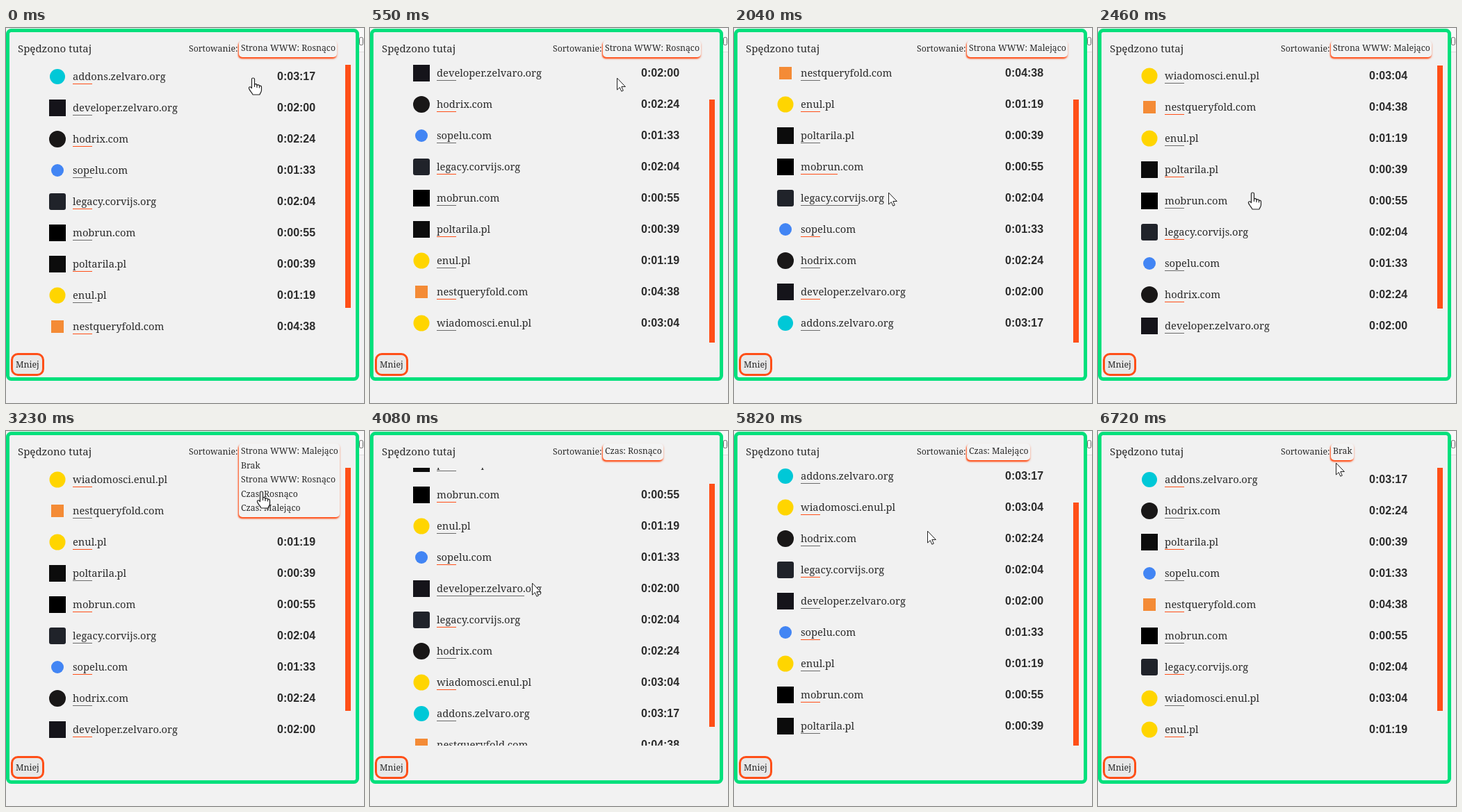
Animation, 515 px wide and 540 px high, one loop 6770 ms. Source, as an HTML page:

```html
<!DOCTYPE html>
<html lang="pl">
<head>
<meta charset="utf-8">
<style>
  html, body { margin: 0; width: 100%; height: 100%; overflow: hidden; background: #f2f2f2; }
  #stage { position: relative; width: 515px; height: 540px; overflow: hidden; cursor: default; }
  svg { position: absolute; left: 0; top: 0; display: block; }
  text, #menu { font-family: "Noto Serif", serif; fill: #2b2b2b; color: #2b2b2b; }
  .small, #menu { font-size: 12.3px; }
  .label { font-size: 14.7px; }
  .time { font: bold 16px "Liberation Sans", Arial, sans-serif; }
  #menu {
    position: absolute; left: 335px; top: 18px; padding: 1px 2px 2px 3px;
    line-height: 20.5px; white-space: nowrap; border-radius: 5px; background: #f3f3f3;
    box-shadow: -1px 2px 2px #ff4f18, 0 2px 3px rgba(255, 79, 24, .5);
  }
</style>
</head>
<body>
<div id="stage">
  <svg width="515" height="540" viewBox="0 0 515 540">
    <defs><clipPath id="view"><rect x="5" y="53" width="480" height="400"/></clipPath></defs>
    <rect width="515" height="540" fill="#f2f2f2"/>
    <rect x="505" width="10" height="34" fill="#f8f8f8"/>
    <path d="M505 34.5H515" stroke="#dedede"/>
    <rect x="508.5" y="13.5" width="5" height="11" rx="2" fill="none" stroke="#666"/>
    <rect x="2.5" y="3.5" width="503" height="502" rx="5" fill="#f1f1f1" stroke="#00e07c" stroke-width="5"/>
    <text x="17" y="35" font-size="15">Spędzono tutaj</text>
    <text x="263" y="34" class="small">Sortowanie:</text>
    <g id="list" clip-path="url(#view)"></g>
    <rect id="thumb" x="488" y="53" width="8" height="350" fill="#ff4f18"/>
    <rect x="8.5" y="469.5" width="45" height="30" rx="8.5" fill="#e8e8e8" stroke="#ff4f18" stroke-width="3"/>
    <text x="14" y="489" class="small">Mniej</text>
  </svg>
  <div id="menu"></div>
  <svg width="515" height="540" viewBox="0 0 515 540">
    <g id="cursor" fill="#fff" stroke="#222" stroke-linejoin="round" stroke-linecap="round">
      <g id="hand" stroke-width="1.2">
        <path d="M-2 1C-2-1 2-1 2 1V9C3 7.5 5.5 8 5.5 10C6.5 8.8 9 9.3 9 11C10 10.3 12 10.8 12 12.5V17C12 20 10 21 9.5 23.5H-.5C-1 21-5 18-6 14.5C-6.5 12.5-4.5 11.5-3 13L-2 14Z"/>
        <path d="M2 9V12M5.5 10V13M9 11V13.5" fill="none"/>
      </g>
      <path id="arrow" d="M0 0V16.5L3.8 13L6.3 18.7L8.8 17.6L6.3 12H11.5Z"/>
    </g>
  </svg>
</div>
<script>
const LOOP = 6770, STEP = 50, ROW = 45, LINE = 20.5, MAX_SCROLL = 50, SHORT = 28;
const $ = id => document.getElementById(id);

const circle = (color, size = 24) => ({ color, size, rx: size / 2 });
const square = (color, size = 24, rx = 0) => ({ color, size, rx });

const items = [
  ["addons.zelvaro.org", "0:03:17", circle("#00c8d7", 22)],
  ["developer.zelvaro.org", "0:02:00", square("#15141a")],
  ["hodrix.com", "0:02:24", circle("#191717")],
  ["sopelu.com", "0:01:33", circle("#4285f4", 18)],
  ["legacy.corvijs.org", "0:02:04", square("#20232a", 24, 3)],
  ["mobrun.com", "0:00:55", square("#000")],
  ["poltarila.pl", "0:00:39", square("#0c0c0c")],
  ["enul.pl", "0:01:19", circle("#ffd500", 23)],
  ["nestqueryfold.com", "0:04:38", square("#f48b36", 18)],
  ["wiadomosci.enul.pl", "0:03:04", circle("#ffd500", 23)]
];

const byName = items.map((_, i) => i);
const byTime = [...byName].sort((a, b) => items[a][1] < items[b][1] ? -1 : 1);
const sorts = [
  ["Brak", [0, 2, 6, 3, 8, 5, 4, 9, 7, 1]],
  ["Strona WWW: Rosnąco", byName],
  ["Strona WWW: Malejąco", [...byName].reverse()],
  ["Czas: Rosnąco", byTime],
  ["Czas: Malejąco", [...byTime].reverse()]
];

// Each round: rest at a spot, open the menu, pick the option on a given line
const rounds = [
  { rest: [355, 72], open: 1130, pick: 1480, from: 1, to: 2, x: 374, line: 2 },
  { rest: [222, 237], open: 2930, pick: 3480, from: 2, to: 3, x: 367, line: 3 },
  { rest: [233, 219], open: 4580, pick: 4880, from: 3, to: 4, x: 375, line: 4 },
  { rest: [278, 144], open: 6280, pick: 6680, from: 4, to: 0, x: 342, line: 1 }
];
const scrolls = [[50, 700], [1630, 2445], [3650, 4130], [5370, 6050]];

// Smooth rise from 0 to 1 between times a and b
function ease(t, a, b) {
  const u = Math.min(1, Math.max(0, (t - a) / (b - a)));
  return u * u * (3 - 2 * u);
}
const mix = (p, q, u) => p.map((v, i) => v + (q[i] - v) * u);

// Down, hold and back up in each scroll span
function scrollAt(t) {
  const lift = ([a, b]) => ease(Math.min(t - a, b - t), 0, .22 * (b - a));
  return Math.round(MAX_SCROLL * Math.max(...scrolls.map(lift)));
}

const option = (r, line) => [r.x, 25 + LINE * line];

function cursorAt(t) {
  const n = rounds.findIndex(r => t < r.pick), last = rounds[rounds.length - 1];
  if (n < 0) return option(last, last.line);
  const r = rounds[n], prev = rounds[n - 1];
  let p = r.rest;
  if (prev) p = mix(option(prev, prev.line), p, ease(t, prev.pick + 50, prev.pick + 450));
  p = mix(p, option(r, 0), ease(t, r.open - 400, r.open));
  return mix(p, option(r, r.line), ease(t, r.open + 50, r.open + 250));
}

const isOpen = t => rounds.some(r => t >= r.open && t < r.pick);

// List position under a moving cursor, or -1
function hoverAt(t) {
  const [x, y] = cursorAt(t), [px, py] = cursorAt(t - STEP);
  const still = Math.hypot(x - px, y - py) < 1;
  return still || y < 53 || isOpen(t) ? -1 : Math.floor((y - 47 + scrollAt(t)) / ROW);
}

// Underlines follow the hover with a short delay
function lineWidth(pos, full, t) {
  let hits = 0;
  for (let k = 0; k < 5; k++) hits += hoverAt(t - 100 - 30 * k) === pos;
  return Math.round(SHORT + (full - SHORT) * hits / 5);
}

function add(parent, tag, attrs, text) {
  const el = document.createElementNS("http://www.w3.org/2000/svg", tag);
  for (const k in attrs) el.setAttribute(k, attrs[k]);
  if (text) el.textContent = text;
  return parent.appendChild(el);
}

const rows = items.map(([label, time, { color, size, rx }]) => {
  const g = add($("list"), "g", {});
  add(g, "rect", { x: 74 - size / 2, y: 70 - size / 2, width: size, height: size, rx, fill: color });
  const name = add(g, "text", { x: 96, y: 75, class: "label" }, label);
  add(g, "text", { x: 390, y: 75, class: "time" }, time);
  const line = add(g, "rect", { x: 96, y: 80, height: 1 });
  return { g, line, full: name.getComputedTextLength() };
});

let menuState = "";
function drawMenu(mode, open) {
  const state = mode + "," + open;
  if (state === menuState) return;
  menuState = state;
  const names = sorts.map(s => s[0]);
  const rest = open ? names.filter((_, i) => i !== mode) : [];
  $("menu").innerHTML = [names[mode], ...rest].map(s => `<div>${s}</div>`).join("");
}

function draw(t) {
  const done = rounds.filter(r => r.pick <= t).pop();
  const mode = done ? done.to : rounds[0].from;
  const scroll = scrollAt(t);
  sorts[mode][1].forEach((id, pos) => {
    const { g, line, full } = rows[id], y = pos * ROW - scroll;
    g.setAttribute("transform", `translate(0 ${y})`);
    line.setAttribute("width", lineWidth(pos, full, t));
    line.setAttribute("fill", y % 2 ? "#6b6b6b" : "#ff4f18");
  });
  $("thumb").setAttribute("y", 53 + scroll);
  drawMenu(mode, isOpen(t));

  const [x, y] = cursorAt(t).map(Math.round);
  const arrow = scroll > 5 || (done && t - done.pick < 500);
  $("cursor").setAttribute("transform", `translate(${x + .5} ${y + .5})`);
  $("arrow").style.display = arrow ? "" : "none";
  $("hand").style.display = arrow ? "none" : "";
}

const stepped = t => Math.max(0, Math.floor((t + 30) / STEP) * STEP - 20);

const start = performance.now();
function tick() {
  draw(stepped((performance.now() - start) % LOOP));
  requestAnimationFrame(tick);
}
tick();
</script>
</body>
</html>
```
